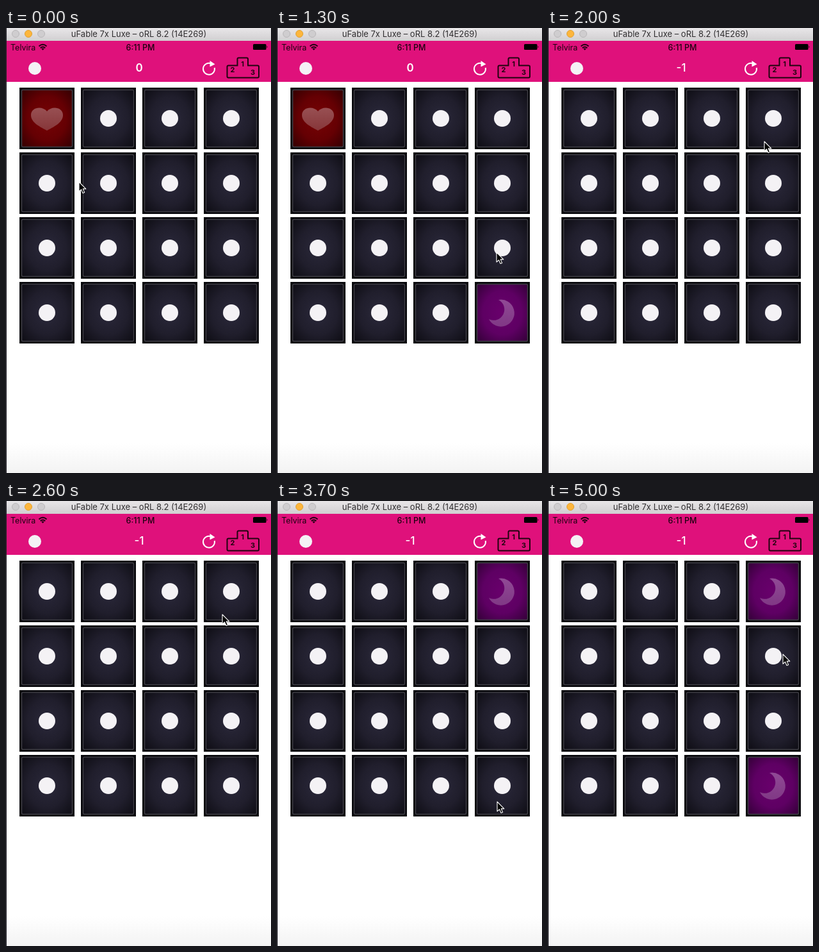
Write an HTML page that moves like this. It is 414 px wide and 694 px high and loops after 5100 ms.

```html
<!DOCTYPE html>
<html lang="en">
<head>
<meta charset="utf-8">
<title>Memory card game</title>
<style>
  html, body { margin: 0; width: 100%; height: 100%; overflow: hidden; background: #fff; }
  svg { display: block; width: 414px; height: 694px; }
  text { font-family: Inter, Roboto, "Liberation Sans", sans-serif; text-anchor: middle; }

  .timed { animation: 5100ms step-end infinite; }
  #heart, #zero { animation-name: first-turn; }
  #minus { animation-name: second-turn; }
  #moon-low { animation-name: moon-low; }
  #moon-top { animation-name: moon-top; }
  #cursor { animation-name: travel; }

  /* One step lasts 100 ms, 1/51 of the loop. */
  @keyframes first-turn { 0% { opacity: 1 } 39.21%, 100% { opacity: 0 } }
  @keyframes second-turn { 0% { opacity: 0 } 39.21%, 100% { opacity: 1 } }
  @keyframes moon-low {
    0% { opacity: 0 } 17.64% { opacity: 1 } 39.21% { opacity: 0 } 76.47%, 100% { opacity: 1 }
  }
  @keyframes moon-top { 0% { opacity: 0 } 52.94%, 100% { opacity: 1 } }
  @keyframes travel {
    0% { transform: translate(113px, 239px); animation-timing-function: steps(3) }
    5.88% { transform: translate(232px, 338px); animation-timing-function: steps(3) }
    11.76% { transform: translate(352px, 436px) }
    13.72% { transform: translate(354px, 444px) }
    25.49% { transform: translate(342px, 349px); animation-timing-function: steps(2) }
    29.41% { transform: translate(320px, 242px); animation-timing-function: steps(2) }
    33.33% { transform: translate(337px, 176px) }
    60.78% { transform: translate(337px, 176px); animation-timing-function: steps(2) }
    64.7% { transform: translate(326px, 268px); animation-timing-function: steps(2) }
    68.62% { transform: translate(320px, 440px) }
    70.58% { transform: translate(336px, 517px) }
    72.54% { transform: translate(343px, 468px) }
    86.27% { transform: translate(343px, 468px); animation-timing-function: steps(6) }
    98.03%, 100% { transform: translate(366px, 238px) }
  }
</style>
</head>
<body>
<svg viewBox="0 0 414 694" xmlns="http://www.w3.org/2000/svg">
  <defs>
    <linearGradient id="chrome" x2="0" y2="1">
      <stop stop-color="#e8e6e8"/><stop offset="1" stop-color="#d1cfd1"/>
    </linearGradient>
    <linearGradient id="floor" x2="0" y2="1">
      <stop stop-color="#fff"/><stop offset="1" stop-color="#f3f3f3"/>
    </linearGradient>
    <radialGradient id="night" r=".7">
      <stop stop-color="#2a283a"/><stop offset=".55" stop-color="#201e2c"/><stop offset="1" stop-color="#0e0d14"/>
    </radialGradient>
    <radialGradient id="red" r=".7">
      <stop stop-color="#780204"/><stop offset=".55" stop-color="#650003"/><stop offset="1" stop-color="#340002"/>
    </radialGradient>
    <radialGradient id="violet" r=".7">
      <stop stop-color="#69006c"/><stop offset=".55" stop-color="#5e0063"/><stop offset="1" stop-color="#340038"/>
    </radialGradient>
    <linearGradient id="blush" x2="0" y2="1">
      <stop stop-color="#985053"/><stop offset="1" stop-color="#863639"/>
    </linearGradient>
    <linearGradient id="lilac" x2="0" y2="1">
      <stop stop-color="#904a95"/><stop offset="1" stop-color="#803885"/>
    </linearGradient>

    <g id="frame">
      <rect width="86" height="96" fill="#08080c"/>
      <rect x="3.5" y="3.5" width="79" height="89" rx="2" stroke="#3f3e45" stroke-width="1.4"/>
    </g>
    <g id="back">
      <use href="#frame" fill="url(#night)"/>
      <circle cx="43" cy="48" r="13" fill="#f4f2f5"/>
    </g>
    <g id="row">
      <use href="#back"/>
      <use href="#back" x="96"/>
      <use href="#back" x="192"/>
      <use href="#back" x="288"/>
    </g>
    <g id="moon">
      <use href="#frame" fill="url(#violet)"/>
      <path d="M37 28A21 21 0 1 1 22 58A16.5 16.5 0 1 0 37 28Z" fill="url(#lilac)"/>
    </g>
  </defs>

  <rect width="414" height="694" fill="#fff"/>
  <rect y="648" width="414" height="46" fill="url(#floor)"/>

  <!-- Window title -->
  <rect width="414" height="20" fill="url(#chrome)"/>
  <g fill="#cfcdcf" stroke="#b9b7b9">
    <circle cx="15" cy="9" r="5.5"/>
    <circle cx="35" cy="9" r="5.5" fill="#fdb63c" stroke="#dfa033"/>
    <circle cx="55" cy="9" r="5.5"/>
  </g>
  <text x="207.5" y="14" font-size="13" fill="#302e30">uFable 7x Luxe – oRL 8.2 (14E269)</text>

  <!-- Status and navigation -->
  <rect y="20" width="414" height="64" fill="#df117b"/>
  <text x="7" y="35" font-size="12.5" fill="#1d0210" style="text-anchor:start">Telvira</text>
  <g fill="none" stroke="#1d0210" stroke-width="2">
    <path d="M51.5 28.5Q57.5 23 63.5 28.5M53.8 31.2Q57.5 27.8 61.2 31.2"/>
    <path d="M55.3 32.2Q57.5 30.6 59.7 32.2L57.5 34.8Z" fill="#1d0210" stroke="none"/>
  </g>
  <text x="210" y="35" font-size="12.5" font-weight="500" fill="#1d0210">6:11 PM</text>
  <rect x="386" y="25" width="20.5" height="9" rx="1.5"/>
  <path d="M407.5 28Q409.5 29.5 407.5 31Z"/>
  <circle cx="45" cy="63" r="10" fill="#f4f2f5"/>
  <g font-size="17" fill="#fff">
    <text id="zero" class="timed" x="208" y="68" font-weight="600">0</text>
    <text id="minus" class="timed" x="208" y="68" font-weight="500">-1</text>
  </g>
  <path d="M319 55A9 9 0 1 0 325.8 62" fill="none" stroke="#fff" stroke-width="2"/>
  <path d="M318.5 51L326.5 56.5L318.5 60.5Z" fill="#fff"/>
  <path d="M347.5 77.5Q345.5 77.5 345.5 75.5V60.5Q345.5 58.5 347.5 58.5H361.5V48.5Q361.5 46.5 363.5 46.5H376Q378 46.5 378 48.5V58.5H393Q395 58.5 395 60.5V75.5Q395 77.5 393 77.5Z"
        fill="none" stroke="#20040f" stroke-width="2"/>
  <g font-size="11" font-weight="700" fill="#20040f">
    <text x="354" y="68.5">2</text>
    <text x="369.5" y="60">1</text>
    <text x="385.5" y="73">3</text>
  </g>

  <!-- Board -->
  <g transform="translate(21 93)">
    <use href="#row"/>
    <use href="#row" y="101"/>
    <use href="#row" y="202"/>
    <use href="#row" y="303"/>
    <g id="heart" class="timed">
      <use href="#frame" fill="url(#red)"/>
      <path d="M43 67C34 62 18 55 18 43C18 30 36 28 43 37C50 28 68 30 68 43C68 55 52 62 43 67Z" fill="url(#blush)"/>
    </g>
    <g id="moon-top" class="timed"><use href="#moon" x="288"/></g>
    <g id="moon-low" class="timed"><use href="#moon" x="288" y="303"/></g>
  </g>

  <rect width="1" height="694" fill="#24222b"/>
  <path id="cursor" class="timed" d="M1 1V16L4.5 12.8L7 18.5L9.6 17.4L7.2 11.9H11.8Z"
        fill="#000" stroke="#fff" stroke-width="1.1" stroke-linejoin="round"/>
</svg>
</body>
</html>
```
